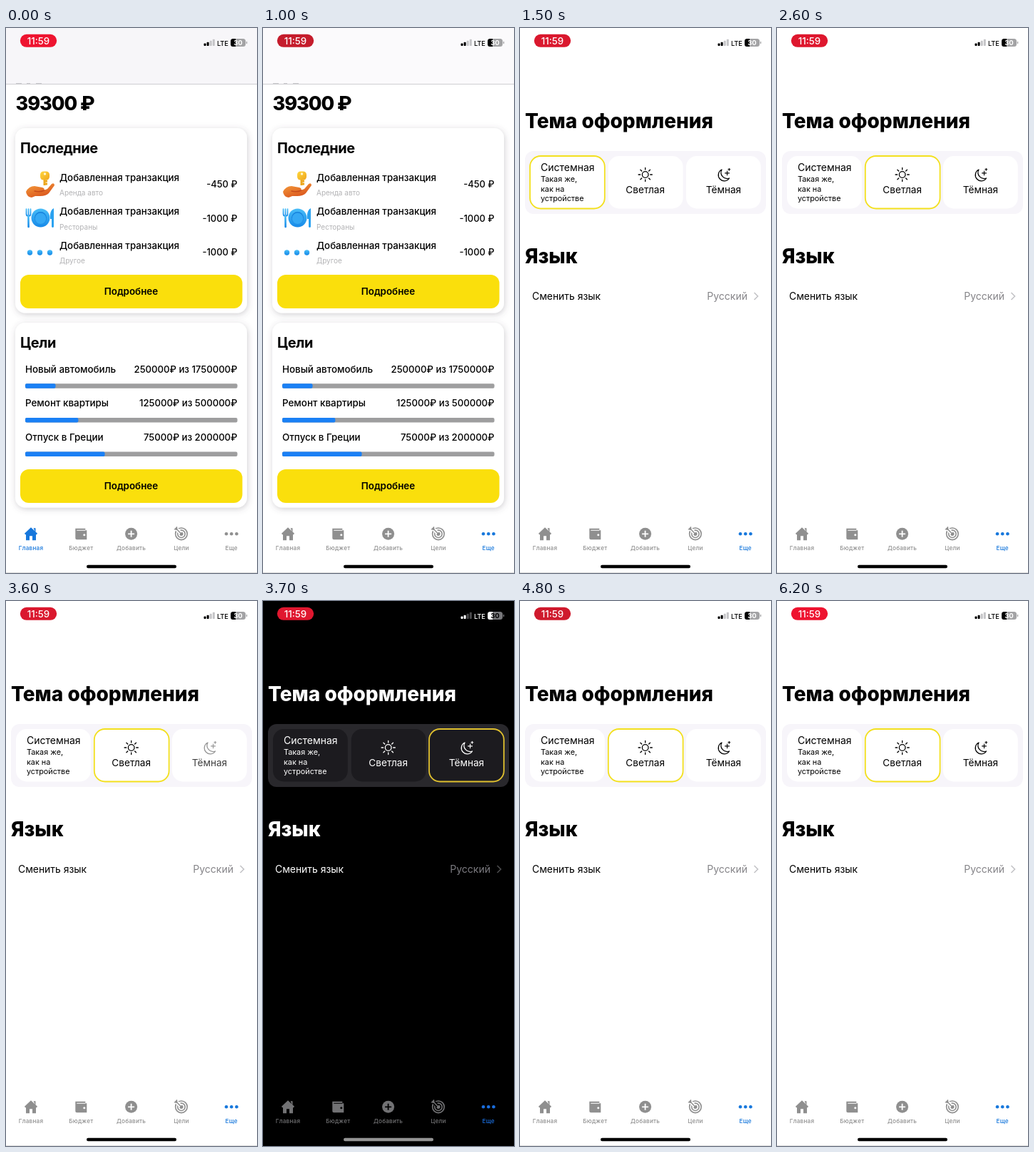
These frames come from a looping animation (352 px wide and 762 px high, 6400 ms). An HTML page:

```html
<!DOCTYPE html>
<html lang="ru">
<head>
<meta charset="utf-8">
<style>
html, body { margin: 0; width: 100%; height: 100%; overflow: hidden; background: #fff; }
svg { display: block; width: 352px; height: 762px; font-family: Inter, "Open Sans", sans-serif;
  --bg: #fff; --fg: #000; --panel: #f7f5fa; --tile: #fff; --press: #fff; --mute: #858488; --pick: #f3e01e;
  --tab: #8f8f8f; --on: #1677dc; --bar: #000; --edge: #dedede; --cell: #a3a3a5; --weak: #c4c4c7; }
svg.dark { --bg: #000; --fg: #fff; --panel: #29282c; --tile: #1c1b1f; --press: #454447; --mute: #7c7b80; --pick: #e0c02e;
  --tab: #727274; --on: #1b6fe0; --bar: #949494; --edge: #000; --cell: #77777a; --weak: #4b4b4d; }
.tab { color: var(--tab); }
.tab.on { color: var(--on); }
.tile rect { fill: var(--tile); }
.tile.press rect { fill: var(--press); }
.tile.press g { opacity: .75; }
.tile.pick rect { stroke: var(--pick); stroke-width: 1.8; }
</style>
</head>
<body>
<svg id="stage" viewBox="0 0 352 762"></svg>
<script>
const stage = document.getElementById('stage');
const FG = 'var(--fg)';

const text = (x, y, s, size, weight = 400, fill = FG, anchor = 'start', gap = 0) =>
  `<text x="${x}" y="${y}" font-size="${size}" font-weight="${weight}" text-anchor="${anchor}" ` +
  `letter-spacing="${gap}" style="fill:${fill}">${s}</text>`;
const rect = (x, y, w, h, r, fill, more = '') =>
  `<rect x="${x}" y="${y}" width="${w}" height="${h}" rx="${r}" style="fill:${fill}" ${more}/>`;
const dots = (x, y, step, r, fill) =>
  [-1, 0, 1].map(i => `<circle cx="${x + i * step}" cy="${y}" r="${r}" fill="${fill}"/>`).join('');
const at = (x, y, s) => `<g transform="translate(${x} ${y})">${s}</g>`;

const defs = `<defs>
  <filter id="soft" x="-10%" y="-10%" width="120%" height="120%">
    <feDropShadow dx="1" dy="2" stdDeviation="4" flood-color="#514a58" flood-opacity=".27"/></filter>
  <linearGradient id="blue" x2="0" y2="1"><stop stop-color="#48bdf8"/><stop offset="1" stop-color="#1689e8"/></linearGradient>
  <linearGradient id="skin" x2=".6" y2="1"><stop stop-color="#f7a03c"/><stop offset="1" stop-color="#d9541d"/></linearGradient>
  <linearGradient id="gold" x2="1" y2="1"><stop stop-color="#ffd83f"/><stop offset="1" stop-color="#efa51c"/></linearGradient>
</defs>`;

const handKey = `
  <path d="M1 30Q5 22 13 22L24 24Q28 25 26 28L31 26L37 19Q41 17 41 21L33 32Q29 36 21 36H14L9 38Q2 37 1 30Z" fill="url(#skin)"/>
  <path d="M13 29Q20 31 27 28" fill="none" stroke="#c74c1c" stroke-width="1.4" stroke-linecap="round"/>
  <path d="M27 10V21M27 15H31M27 19H31" stroke="#eca71f" stroke-width="3"/>
  <rect x="21" y="1.500" width="13" height="12" rx="4.500" fill="url(#gold)"/>
  <circle cx="27.500" cy="5" r="1.700" fill="#fff6d2"/>`;
const plate = `
  <g fill="none" stroke="url(#blue)" stroke-linecap="round">
    <path d="M1.500 3V10Q1.500 13 4.500 13T7.500 10V3M4.500 3V13" stroke-width="1.700"/>
    <path d="M4.400 13L4.600 28" stroke-width="2.600"/></g>
  <path d="M40 2Q34 5 35 17H37V28Q38.500 30 40 28Z" fill="#2ba2f0"/>
  <circle cx="21.500" cy="15.500" r="13" fill="url(#blue)"/>
  <circle cx="21.500" cy="15.500" r="8.500" fill="#1580dc"/>
  <circle cx="21.500" cy="16.300" r="7.800" fill="#35a8f4"/>`;

function card(y, title) {
  return rect(13, y, 325, 258.500, 14, '#fff', 'filter="url(#soft)"') +
    text(20, y + 34.500, title, 19.900, 700, '#000', 'start', -.4) +
    rect(20, y + 205, 311.500, 47, 12, '#fadf0c') +
    text(175.500, y + 232.800, 'Подробнее', 13.400, 600, '#000', 'middle');
}

function deal(i, name, sum) {
  const y = 213.500 + i * 47.600;
  return text(75, y, 'Добавленная транзакция', 13.300, 500) +
    text(75, y + 20.500, name, 10, 400, '#b3b3b5') +
    text(324.500, y + 9.500, sum + ' ₽', 12.900, 500, '#000', 'end');
}

function goal(i, name, have, need) {
  const y = 481.800 + i * 47.600;
  return text(27, y, name, 13.400, 500) +
    text(324.500, y, `${have}₽ из ${need}₽`, 13.150, 500, '#000', 'end') +
    rect(27, y + 15.500, 297.500, 6.500, 2, '#9e9e9f') +
    rect(27, y + 15.500, 297.500 * have / need, 6.500, 2, '#1a80f5');
}

const home = `<g id="home">
  ${rect(0, 0, 352, 78, 0, '#f7f6f9', 'id="nav"')}
  <path d="M0 78.500H352" stroke="#cfced2"/>
  <path d="M14 77.500H22M29 77.500H34M42 77.500H50" stroke="#bcbbbf" stroke-width=".8"/>
  ${text(13.500, 115.300, '39300 ₽', 27, 800, '#000', 'start', -1)}
  ${card(140, 'Последние')}
  ${deal(0, 'Аренда авто', '-450')}${deal(1, 'Рестораны', '-1000')}${deal(2, 'Другое', '-1000')}
  ${at(27, 199, handKey)}${at(27, 250, plate)}${dots(47.500, 314, 14, 3.700, 'url(#blue)')}
  ${card(412, 'Цели')}
  ${goal(0, 'Новый автомобиль', 250000, 1750000)}
  ${goal(1, 'Ремонт квартиры', 125000, 500000)}
  ${goal(2, 'Отпуск в Греции', 75000, 200000)}
</g>`;

const rays = [...Array(8)].map((_, i) =>
  `<path d="M0 -7V-9.600" transform="rotate(${i * 45})"/>`).join('');
const line = s => `<g fill="none" style="stroke:${FG}" stroke-width="1.3" stroke-linecap="round" stroke-linejoin="round">${s}</g>`;
const sun = at(175.700, 205, line(`<circle r="4.300"/>${rays}`));
const moon = at(285, 205.500, line(
  `<path d="M-2 -7.500A8.300 8.300 0 1 0 8.500 4.500A8.500 8.500 0 0 1 -2 -7.500Z"/>
   <path d="M5.500 -5.500V.3M2.600 -2.600H8.400M8.300 -9.300V-6.300M6.800 -7.800H9.800" stroke-width="1.100"/>`));

const tile = (x, inner) =>
  `<g class="tile"><rect x="${x}" y="179" width="104.800" height="73.500" rx="15"/><g>${inner}</g></g>`;

const settings = `<g id="settings">
  ${text(7, 140, 'Тема оформления', 28, 800)}
  ${rect(7, 172, 338, 88, 12, 'var(--panel)')}
  ${tile(14, text(29, 200, 'Системная', 14) +
    ['Такая же,', 'как на', 'устройстве'].map((s, i) => text(29, 215 + i * 13.500, s, 10.800)).join(''))}
  ${tile(123.800, sun + text(175.700, 231, 'Светлая', 13.600, 400, FG, 'middle'))}
  ${tile(233, moon + text(285.500, 231, 'Тёмная', 13.600, 400, FG, 'middle'))}
  ${text(7, 329, 'Язык', 28, 800)}
  ${text(17, 380, 'Сменить язык', 13.900)}
  ${text(319, 380, 'Русский', 14, 400, 'var(--mute)', 'end')}
  <path d="M328.500 370L333.500 375L328.500 380" fill="none" style="stroke:var(--weak)" stroke-width="1.600"/>
</g>`;

const cc = 'currentColor', gapInk = 'style="stroke:var(--bg)" fill="none"';
const tabs = [
  ['Главная', `<path d="M0 -9L9 -.5L8 1H7V9H2V3H-2V9H-7V1H-8L-9 -.5Z M3.500 -8H6.500V-2Z" fill="${cc}"/>`],
  ['Бюджет', `<path d="M-8 -7.500H6V-5H8V8H-6Q-8 8 -8 6Z" fill="${cc}"/>
    <path d="M-6 -5H6" ${gapInk} stroke-width="1"/><circle cx="4.500" cy="1.500" r="1.500" style="fill:var(--bg)"/>`],
  ['Добавить', `<circle r="8.500" fill="${cc}"/><path d="M-4.500 0H4.500M0 -4.500V4.500" ${gapInk} stroke-width="1.800"/>`],
  ['Цели', `<g fill="none" stroke="${cc}" stroke-width="1.600"><circle r="8.300"/><circle r="5.200"/></g>
    <circle r="2.600" fill="${cc}"/><path d="M-1 -1L-7 -7" ${gapInk} stroke-width="5"/>
    <path d="M0 0L-6 -6M-9 -6.500L-6 -6L-6.500 -9Z" fill="${cc}" stroke="${cc}" stroke-width="1.500"/>`],
  ['Еще', dots(0, 0, 7.200, 2.300, cc)]
].map(([name, icon], i) => `<g class="tab">${at(35 + i * 70.300, 707.300, icon)}
  ${text(35 + i * 70.300, 729.600, name, 8.200, 500, cc, 'middle', .2)}</g>`).join('');

const status = rect(19.800, 8.800, 51.400, 18, 9, '#ed1430', 'id="pill"') +
  text(45.500, 22.600, '11:59', 13.300, 500, '#fff', 'middle') +
  [3.500, 5.200, 7.200, 9.200].map((h, i) =>
    rect(277.500 + i * 4.100, 25 - h, 3, h, .8, i < 2 ? FG : 'var(--weak)')).join('') +
  text(296, 24.500, 'LTE', 9.200, 500) +
  rect(315, 15, 21, 11, 3.500, 'var(--cell)') +
  `<path d="M322 15H318.500Q315 15 315 18.500V22.500Q315 26 318.500 26H322Z" style="fill:${FG}"/>` +
  rect(336.800, 18.700, 1.400, 3.600, .7, 'var(--cell)') +
  text(325.500, 24, '30', 9.500, 700, 'var(--bg)', 'middle');

stage.innerHTML = defs + rect(0, 0, 352, 762, 0, 'var(--bg)') + home + settings + status + tabs +
  rect(113, 750.800, 126, 4.400, 2.200, 'var(--bar)') +
  rect(0, 761, 352, 1, 0, 'var(--edge)');

// [time in ms, value]
const LOOP = 6400;
const glow = [[0, 1], [900, 0], [1100, 0], [1500, .5], [1900, 1], [2400, 1], [2900, 0], [3400, 0],
  [3600, .5], [3900, 1], [4200, 1], [4700, .5], [4900, 0], [5300, 0], [5900, 1], [LOOP, 1]];
const tabAt = [[0, 0], [900, 4]];
const pageAt = [[0, 'home'], [1100, 'settings']];
const pickAt = [[0, 0], [2600, 1], [3700, 2], [4800, 1], [5600, 0], [6200, 1]];
const pressAt = [[0, -1], [2500, 1], [2600, -1], [3500, 2], [3700, -1], [4700, 1], [4800, -1],
  [5500, 0], [5600, -1], [6100, 1], [6200, -1]];

const step = (table, t) => table.filter(k => k[0] <= t).pop()[1];
function blend(table, t) {
  const i = table.findIndex(k => k[0] > t);
  const [a, u] = table[i - 1], [b, v] = table[i];
  return u + (v - u) * (t - a) / (b - a);
}

const $ = id => document.getElementById(id);
const pill = $('pill'), nav = $('nav');
const tabEls = [...stage.querySelectorAll('.tab')];
const tileEls = [...stage.querySelectorAll('.tile')];
const low = [197, 28, 44], high = [238, 20, 48];

function draw(now) {
  const t = Math.floor(now % LOOP / 100) * 100;
  const g = blend(glow, t), page = step(pageAt, t), pick = step(pickAt, t);
  pill.style.fill = `rgb(${low.map((c, i) => c + (high[i] - c) * g)})`;
  nav.style.fill = t < 1000 ? '#f7f6f9' : '#fbfafc';
  $('home').style.display = page === 'home' ? '' : 'none';
  $('settings').style.display = page === 'home' ? 'none' : '';
  stage.classList.toggle('dark', page === 'settings' && pick === 2);
  tabEls.forEach((e, i) => e.classList.toggle('on', i === step(tabAt, t)));
  tileEls.forEach((e, i) => {
    e.classList.toggle('pick', i === pick);
    e.classList.toggle('press', i === step(pressAt, t));
  });
}

const start = performance.now();
function tick() {
  draw(performance.now() - start);
  requestAnimationFrame(tick);
}
tick();
</script>
</body>
</html>
```
